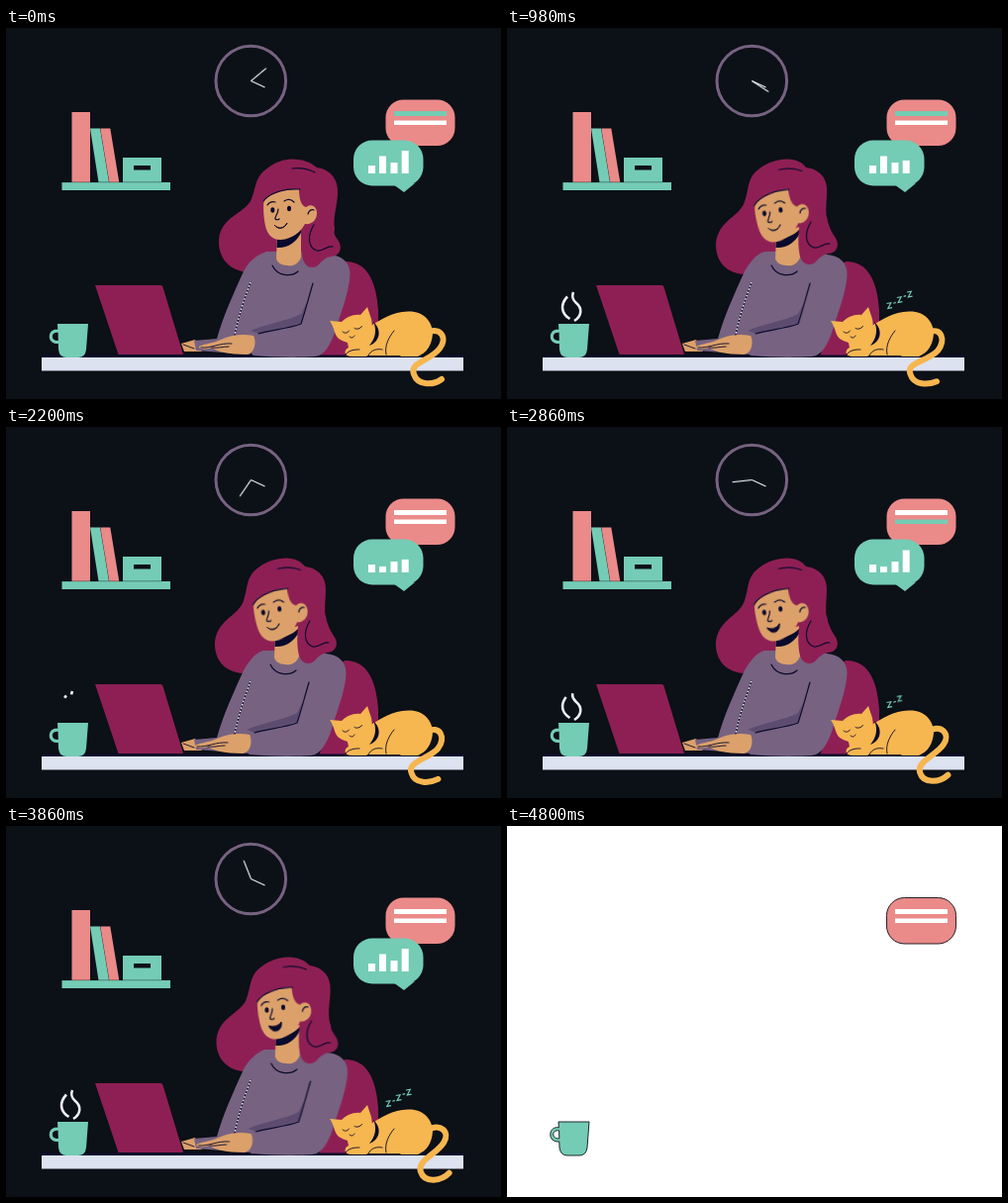
An HTML page for the animation above (4820 ms loop, 500 by 375 pixels).

```html
<!DOCTYPE html>
<html lang="en">
<head>
<meta charset="utf-8">
<title>Evening at the desk</title>
<style>
  :root {
    --bg: #0c1017; --ink: #090a2c; --plum: #8e1f54; --mauve: #776281;
    --skin: #dca06a; --teal: #74ccb5; --pink: #ea8a89; --cat: #f6b650;
    --loop: 4820ms; --half: 2410ms;
  }
  html, body { margin: 0; width: 100%; height: 100%; overflow: hidden; background: var(--bg); }
  svg { display: block; width: 100vw; height: 100vh; }

  .plum { fill: var(--plum); }
  .mauve { fill: var(--mauve); }
  .skin { fill: var(--skin); }
  .teal { fill: var(--teal); }
  .pink { fill: var(--pink); }
  .cat { fill: var(--cat); }
  .ink { fill: var(--ink); }
  .line { fill: none; stroke: var(--ink); stroke-width: 1.2; stroke-linecap: round; stroke-linejoin: round; }
  .thin { stroke-width: .9; }

  .minute { transform-origin: 247.5px 53.5px; animation: turn var(--loop) linear infinite; }
  @keyframes turn { from { transform: rotate(-40deg); } to { transform: rotate(320deg); } }

  .head, .hair, .lock, .torso, .neck { animation: var(--loop) ease-in-out infinite; }
  .head { transform-origin: 287px 225px; animation-name: tilt; }
  .hair { animation-name: sway; }
  .lock { animation-name: hang; }
  .torso { animation-name: lean; }
  .neck { animation-name: shift; }
  @keyframes tilt {
    0%, 98.5%, 100% { transform: none; }
    22.4%, 66% { transform: translate(-4.6px, 1px) rotate(-7deg); }
  }
  @keyframes sway {
    0%, 98.5%, 100% { d: path("M289 132.5C300 132.5 308 136 314 141C328 143 336 153 335 168C334 183 330 192 332 203L328 236H262L243 247C222 244 214 229 215 213C218 191 239 188 247 175C253 163 250 151 265 141C272 136 280 132.5 289 132.5Z"); }
    22.4%, 66% { d: path("M283 132.5C292 132.5 298 136 302 141C316 143 324 152 323 167C322 182 321 192 326 202L322 234H262L240 249C219 248 210 233 211 217C214 195 232 192 239 178C245 164 241 152 255 142C263 136 273 132.5 283 132.5Z"); }
  }
  @keyframes hang {
    0%, 98.5%, 100% { transform: none; }
    22.4%, 66% { transform: translate(-4px, -3px); }
  }
  @keyframes lean {
    0%, 98.5%, 100% { transform: none; }
    22.4%, 66% { transform: translateX(-4px); }
  }
  @keyframes shift {
    0%, 98.5%, 100% { transform: none; }
    22.4%, 66% { transform: translateX(-2px); }
  }

  .mouth { fill: var(--ink); stroke: var(--ink); stroke-linejoin: round; animation: talk var(--loop) ease-in-out infinite; }
  @keyframes talk {
    0%, 56%, 97%, 100% { d: path("M271 199C275 204 281 203 284 197C281 203 275 204 271 199Z"); }
    61%, 92% { d: path("M270 200C275 202 280 201 283 197C284 206 274 210 270 200Z"); }
  }

  .tail { fill: none; stroke: var(--cat); stroke-width: 6; stroke-linecap: round; animation: wag var(--loop) ease-in-out infinite; }
  @keyframes wag {
    0%, 100% { d: path("M424 308C440 301 446 314 438 324C428 337 407 338 412 350C416 362 432 361 440 355"); }
    31.1% { d: path("M424 308C439 301 443 317 434 327C424 337 401 338 406 350C409 361 423 361 432 358"); }
    72.6% { d: path("M424 308C440 299 449 309 443 319C436 331 417 338 420 349C424 362 442 358 449 350"); }
  }

  .mark { fill: #fff; animation: var(--loop) step-end infinite; }
  .first { animation-name: first; }
  .second { animation-name: second; }
  @keyframes first { 0% { fill: var(--teal); } 25%, 100% { fill: #fff; } }
  @keyframes second { 0%, 75%, 100% { fill: #fff; } 50% { fill: var(--teal); } }

  .bar { fill: #fff; transform-origin: 0 147px; animation: bar var(--loop) var(--wait, 0ms) ease-in-out infinite backwards; }
  @keyframes bar {
    0%, 12%, 60%, 100% { transform: none; }
    16%, 56% { transform: scaleY(var(--low)); }
  }

  .steam { fill: none; stroke: #f0f2fa; stroke-width: 2.6; stroke-dasharray: 1 3; animation: steam var(--half) linear infinite; }
  @keyframes steam {
    0%, 2% { stroke-dashoffset: 1; }
    20%, 77% { stroke-dashoffset: 0; }
    93%, 100% { stroke-dashoffset: -1; }
  }

  .snore path {
    fill: none; stroke: var(--teal); stroke-width: 1.15;
    transform-box: fill-box; transform-origin: center;
    animation: snore var(--half) calc(var(--i) * 120ms) linear infinite backwards;
  }
  @keyframes snore {
    0%, 3%, 70%, 100% { transform: scale(0); }
    9%, 66% { transform: none; }
  }

  .flash { visibility: hidden; animation: flash var(--loop) step-end infinite; }
  @keyframes flash { 0% { visibility: hidden; } 99.585%, 100% { visibility: visible; } }
</style>
</head>
<body>
<svg viewBox="0 0 500 375" preserveAspectRatio="none">
  <defs>
    <path id="mug" class="teal" d="M52 299H83L81 325Q80 333 73 333H61Q54 333 53 325L52.8 319C47 319.5 43.5 316 43.8 311.5C44 306.5 48 304 52.3 304.8ZM52.6 307.8C48.5 307.5 46.7 309.5 46.8 312C47 314.8 49.5 316.2 52.8 315.9Z" fill-rule="evenodd"/>
    <rect id="note" class="pink" x="383.5" y="72.5" width="70" height="46.500" rx="18"/>
  </defs>

  <!-- wall -->
  <circle cx="247.3" cy="53.5" r="35.3" fill="none" stroke="#776281" stroke-width="3"/>
  <path d="M247.5 53.5L261.5 60" stroke="#e6e8f0" stroke-width="1.2"/>
  <path class="minute" d="M247.5 53.5H267.5" stroke="#e6e8f0" stroke-width="1.2"/>

  <path class="pink" d="M66.5 85H85V156H66.500Z"/>
  <path class="teal" d="M85 101.500H95L104 156H93.500Z"/>
  <path class="pink" d="M95.3 101.500H105.300L114.300 156H104.300Z"/>
  <path class="teal" d="M118 131H157V156H118ZM56.500 156H166V164H56.500Z"/>
  <path d="M57 155.800H157" stroke="#0c1017" stroke-width=".4"/>
  <rect x="129" y="139" width="17" height="4.500" fill="#0c1017"/>

  <use href="#note"/>
  <rect class="mark first" x="392" y="84" width="53" height="5"/>
  <rect class="mark second" x="392" y="93.500" width="53" height="4.500"/>

  <rect class="teal" x="351" y="113.500" width="70.500" height="46" rx="19"/>
  <path class="teal" d="M391 158L402 166L413 157Z"/>
  <rect class="bar" style="--low:1" x="366" y="139" width="7" height="8"/>
  <rect class="bar" style="--low:.34; --wait:675ms" x="377" y="129.500" width="7" height="17.500"/>
  <rect class="bar" style="--low:1" x="388.500" y="136" width="7" height="11"/>
  <rect class="bar" style="--low:.57" x="399.700" y="124" width="7" height="23"/>

  <!-- chair and desk -->
  <path class="plum" d="M316 332C330 300 330 238 343 236C364 236 374 255 376 285V332Z"/>
  <rect x="36" y="333" width="426" height="13.500" fill="#dce2f0"/>
  <rect class="ink" x="36" y="330.500" width="426" height="2.500"/>

  <!-- woman -->
  <path class="hair plum" d="M289 132.500Z"/>
  <path class="skin" d="M177 319L191 315L198 327H180Z"/>
  <path class="line thin" d="M179 320L190 324"/>
  <path class="mauve" d="M264 226C253 229 245 236 240 246C230 268 219 292 213 314L190 316L192 326L246 330L275 300L284 240Z"/>

  <g class="torso">
    <path class="mauve" d="M264 226C252 230 246 240 245 260L236 318L250 331C270 333 297 333 312 332C322 331 328 320 333 305C338 288 347 266 347.500 249C348 238 340 230 327 229L298 226Z"/>
    <path d="M247 306C262 299 285 296 298 289L304 277L298 298C284 303 267 304 256 309Z" fill="#5d4c70"/>
    <path class="line" d="M310 258C306 272 302 287 298 299C285 304 268 305 255 309"/>
    <path class="skin" d="M250 311C240 309 230 310 222 313L212 317C205 319 198 320 195 322C194 325 203 325 208 323C213 327 224 330 243 330C252 329 253 316 250 311Z"/>
    <path class="line thin" d="M197 323C207 324 216 318 228 319M208 323C214 324 219 322 225 322"/>
  </g>
  <path class="line" d="M247 257C241 273 235 291 231 310" stroke-width="1.800"/>
  <path d="M247 257C241 273 235 291 231 310" fill="none" stroke="#fff" stroke-width="1.300" stroke-dasharray="1.500 2"/>

  <g class="neck">
    <path class="skin" d="M274 207L298 201V232C295 239 290 241 284 240C278 240 274 237 273 233Z"/>
    <path class="ink" d="M274 211C284 214 292 209 298 203V207C293 217 284 223 273.500 222Z"/>
    <path class="line" d="M269 240C274 251 288 252 295 246"/>
  </g>

  <g class="lock">
    <path class="plum" d="M302 188C298 205 297 222 300 234C303 243 311 244 316 239C319 235 323 232 328 231C337 231 341 222 335 214C331 208 328 202 327 194L318 184Z"/>
    <path class="line" d="M311 199C304 210 305 222 314 225C321 226 323 220 330 221"/>
  </g>

  <g class="head">
    <path class="skin" d="M262 166C259 177 260 190 262 200C264 209 270 215 278 214C289 213 297 207 302 198C309 199 314 194 314 187C314 180 308 177 303 181L298 158Z"/>
    <path class="plum" d="M258 180C260 174 265 169 273 167C281 163 289 162 296 163C296 172 298 180 303 181C307 178 311 178 314 182L322 162C313 148 292 142 271 150C259 157 253 170 258 180Z"/>
    <path class="line" d="M260 175C267 166 282 162 297 163M289 142C298 141 306 143 312 146"/>
    <path class="line" d="M305 188C306 184 309 183 311 184M264 179C266 176 269 175 272 176M281 175C284 173 288 173 291 176M275 183C275 188 271 191 272 193C273 194 275 194 276 193"/>
    <ellipse class="ink" cx="269.300" cy="184" rx="2" ry="2.800"/>
    <ellipse class="ink" cx="286" cy="182.500" rx="2" ry="2.800"/>
    <path class="mouth" d="M271 199Z"/>
  </g>

  <!-- laptop and mug -->
  <path class="plum" d="M90 260H156Q158 260 158.500 262L179 330H113.500Z"/>
  <use href="#mug"/>
  <path class="steam" pathLength="1" d="M63.500 294C54 288 54 279 61 271.500"/>
  <path class="steam" pathLength="1" d="M68 296C76 291 76 283 70 278C65.500 274 65.500 271 67 267"/>

  <!-- cat -->
  <path class="tail" d="M424 308Z"/>
  <path class="cat" d="M367 302C380 294 390 287 406 286.500C422 286 431 297 431 309C430 321 425 328 416 332H349C341 332 341 325 346 323L344 314Z"/>
  <path class="cat" d="M327 296L339 297C344 292 351 289 358 290L365 282L369 294C371 304 369 312 362 316C352 321 341 318 335 313C331 308 332 303 327 296Z"/>
  <path class="ink" d="M371 297C380 305 378 317 367 321C373 314 375 305 371 297Z"/>
  <path class="line thin" d="M340 307C342 309 345 308.500 346.500 306M352 303.500C354 305 358 304 359.500 301.500M347 312C349 314 351 313 352 311M392 306C387 312 382 321 384 330M343 330C347 325 353 325 357 325M366 331C369 325 375 324 380 325M365 331.500H398"/>

  <g class="snore">
    <path style="--i:0" d="M383.500 278.500l4.300-.8-3 5.700 4.300-.8"/>
    <path style="--i:1" d="M390.300 278.200l2.500-.8"/>
    <path style="--i:2" d="M393.800 272.500l4.300-.8-3 5.700 4.300-.8"/>
    <path style="--i:3" d="M400.600 271.400l2.500-.8"/>
    <path style="--i:4" d="M404 267l4.300-.8-3 5.700 4.300-.8"/>
  </g>

  <!-- white blink that closes the loop -->
  <g class="flash">
    <rect width="500" height="375" fill="#fff"/>
    <g stroke="#0c1017" stroke-width=".9">
      <use href="#mug"/>
      <use href="#note"/>
    </g>
    <path d="M392 84H445V89H392ZM392 93.500H445V98H392Z" fill="#fff"/>
  </g>
</svg>
</body>
</html>
```
